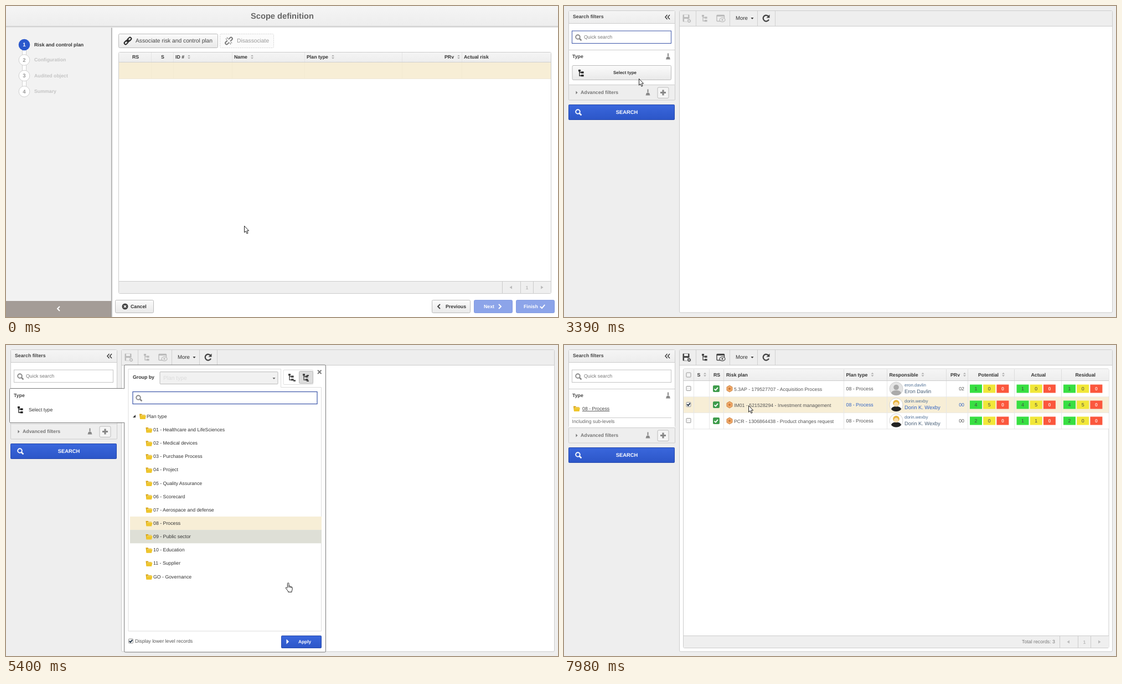
An HTML page for the animation above (8 s loop, 997 px wide and 562 px high).

```html
<!DOCTYPE html>
<html lang="en">
<head>
<meta charset="utf-8">
<title>Scope definition</title>
<style>
html, body { margin: 0; width: 100%; height: 100%; overflow: hidden; background: #eee; }
svg { display: block; width: 100%; height: 100%; font-family: "Liberation Sans", Arial, sans-serif; text-rendering: geometricPrecision; }
</style>
</head>
<body>
<svg id="stage" viewBox="0 0 997 562"></svg>
<script>
const LOOP = 8000;
const BASE = 8.78;

// Markup helpers
const rect = (x, y, w, h, fill, stroke = 'none', rx = 0, extra = '') =>
  `<rect x="${x}" y="${y}" width="${w}" height="${h}" rx="${rx}" fill="${fill}" stroke="${stroke}" ${extra}/>`;
const path = (d, stroke = 'none', width = 1, fill = 'none', extra = '') =>
  `<path d="${d}" stroke="${stroke}" stroke-width="${width}" fill="${fill}" ${extra}/>`;
const circle = (x, y, r, fill, stroke = 'none', width = 1) =>
  `<circle cx="${x}" cy="${y}" r="${r}" fill="${fill}" stroke="${stroke}" stroke-width="${width}"/>`;
const text = (x, y, s, fill = '#333', size = BASE, extra = '') =>
  `<text x="${x}" y="${y}" fill="${fill}" font-size="${size}" ${extra}>${s}</text>`;
const bold = (x, y, s, fill = '#333', size = BASE, extra = '') =>
  text(x, y, s, fill, size, 'font-weight="700" ' + extra);
const group = (id, body, extra = '') => `<g id="${id}" ${extra}>${body}</g>`;
const at = (x, y, body, extra = '') => `<g transform="translate(${x} ${y}) ${extra}">${body}</g>`;
const vlines = (xs, y1, y2, color) => xs.map(x => path(`M${x + .5} ${y1}V${y2}`, color)).join('');
const MID = 'text-anchor="middle"';
const END = 'text-anchor="end"';

// Icons
const chain = (color, broken) => [-1, 1].map(k =>
  rect(k * 4 - 4, -2.4, 8, 4.8, 'none', color, 2.4, 'stroke-width="1.9"')).join('') +
  (broken ? path('M0 -4V4', '#f6f6f6', 3) + path('M-1 -7V-4M2 -7L1.5 -4M-2 7L-1.5 4M1 7V4', color, 1)
          : path('M-3 0H3', color, 1.6));
const sorter = (x, y) => path(`M${x} ${y - 1}l2.5 -2.5l2.5 2.5zM${x} ${y + 1}l2.5 2.5l2.5 -2.5z`, 'none', 1, '#aaa');
const lens = (x, y, color, r = 3.8) =>
  circle(x, y, r, 'none', color, 1.9) + path(`M${x + 3} ${y + 3}l3.4 3.4`, color, 2.6);
const tree = (x, y, c) => at(x, y,
  path('M-3 -5V5H1M-3 -1H1', c, 1.3) + rect(-5, -6, 4, 3.4, c) + rect(0, -2.6, 4.6, 3.4, c) + rect(0, 3, 4.6, 3.4, c));
const brush = (x, y) => at(x, y, rect(-1, -5.5, 2, 6, '#888') + path('M-2.5 1H2.5L4 5.5H-4Z', 'none', 1, '#888'));
const folder = (x, y) => at(x, y,
  path('M0 -4.5H4L5 -3H10.5V4.5H1Z', 'none', 1, '#d9a514') + path('M1.5 -1.5H12L10.5 5H1Z', 'none', 1, '#efc62c') +
  path('M2 -1.8H11', '#fff3b0', .8));
const chevron = (x, y, dir, c, w = 1.9) =>
  path(`M${x - dir * 2} ${y - 4}l${dir * 4} 4l${-dir * 4} 4`, c, w);
const tick = (x, y, c, k = 1) => path(`M${x - 4 * k} ${y}l${3 * k} ${3 * k}l${5 * k} ${-6 * k}`, c, 1.9);
const checkBox = (x, y) => rect(x - 4, y - 4, 8, 8, '#f4f4f4', '#999', 1);
const pager = (y, xs, h) => vlines(xs, y - h, y + h, '#ccc') +
  path(`M${xs[0] + 18} ${y - 3}v6l-4.5 -3zM${xs[2] + 14} ${y - 3}v6l4.5 -3z`, 'none', 1, '#bbb') +
  bold((xs[1] + xs[2]) / 2 + .5, y + 3, '1', '#bbb', BASE, MID);

// Scope definition screen
function scopeScreen() {
  const steps = ['Risk and control plan', 'Configuration', 'Audited object', 'Summary'];
  const stepY = [70, 97.5, 126, 154.5];
  let s = rect(0, 0, 997, 562, '#fff') + rect(0, 38, 190, 524, '#f2f2f2') +
    rect(190, 38, 1, 524, '#999') + rect(191, 38, 2, 524, '#e6e6e6') +
    rect(0, 0, 997, 37, 'url(#bar)') + rect(0, 36.5, 997, 1.2, '#b5b5b5') + rect(0, 37.7, 997, 1.6, '#e8e8e8') +
    bold(499, 22.6, 'Scope definition', '#666', 14.65, MID) +
    rect(0, 533, 190, 29, '#a49c97') + chevron(95, 547, -1, '#fff');
  s += rect(29.5, 75, 7, 76, '#fff', '#d2d2d2');
  steps.forEach((label, i) => {
    const y = stepY[i];
    s += circle(33, y, i ? 9.8 : 10.3, i ? '#fff' : '#2a58cc', i ? '#d0d0d0' : 'none') +
      bold(33, y + 3.4, i + 1, i ? '#999' : '#fff', 9.6, MID) +
      bold(51, y + 2.7, label, i ? '#c4c4c4' : '#333');
  });
  s += `<rect id="assoc" x="203.5" y="50.5" width="179" height="25" rx="2"/>` +
    at(220, 63, chain('#222'), 'rotate(-45)') + text(234, 66, 'Associate risk and control plan', '#444', 10.25) +
    rect(386.5, 50.5, 97, 25, '#fbfbfb', '#ddd', 2, 'stroke-dasharray="3 1"') +
    at(402.5, 63, chain('#777', true), 'rotate(-45)') + text(417, 66, 'Disassociate', '#999', 10.25);
  s += rect(203.5, 83.5, 781, 436, '#fff', '#ccc', 2) + rect(204, 84, 780, 17, 'url(#bar)') +
    rect(204, 101, 780, 1, '#d0d0d0') + rect(204, 102, 780, 29, '#f7eed6') + rect(204, 131, 780, 1, '#eee8d8') +
    vlines([262, 302, 408, 539, 715, 823], 84, 101, '#e4e4e4') +
    vlines([262, 302, 408, 539, 715, 823], 102, 131, '#f3ead2');
  [[228, 'RS'], [280, 'S'], [306, 'ID #'], [412, 'Name'], [543, 'Plan type'], [792, 'PRv'], [827, 'Actual risk']]
    .forEach(([x, label]) => s += bold(x, 95, label));
  [328, 442, 588, 815].forEach(x => s += sorter(x, 92));
  s += rect(204, 497, 780, 22, '#efefef') + rect(204, 497, 780, 1, '#ccc') + pager(508.5, [896, 929, 952], 11);
  const button = (x, fill, stroke) => rect(x + .5, 531.5, 69, 23, fill, stroke, 2);
  s += button(197, 'url(#btn)', '#bbb') + circle(215, 543, 5.5, '#444') + path('M213 541l4 4m0 -4l-4 4', '#fff', 1.4) +
    bold(225, 546, 'Cancel') +
    button(769, 'url(#btn)', '#bbb') + chevron(782, 543, -1, '#444') + bold(794, 546, 'Previous') +
    button(845, '#8ca4e9', '#839be2') + bold(863, 546, 'Next', '#fff') + chevron(892, 543, 1, '#fff') +
    button(921, '#8ca4e9', '#839be2') + bold(935, 546, 'Finish', '#fff') + tick(969, 543, '#fff', 1.05);
  return s;
}

// Search screen: filters on the left, toolbar on the right
function searchScreen() {
  const floppy = c => rect(214.5, 15.5, 12, 13, c, 'none', 1) + rect(217, 16, 7, 4, '#eee') + rect(217, 23, 6, 5, '#eee') +
    circle(226, 27, 3.6, c, '#eee') + path('M224.6 25.6l2.8 2.8m0 -2.8l-2.8 2.8', '#fff', .9);
  const viewer = c => rect(276, 16.5, 13.5, 11, 'none', c, 1, 'stroke-width="1.4"') + rect(276, 16, 13.5, 3, c) +
    `<ellipse cx="286" cy="25" rx="5" ry="3.6" fill="#eee" stroke="${c}" stroke-width="1.2"/>` + circle(286, 25, 1.6, c);
  const tools = c => floppy(c) + tree(254, 22, c) + viewer(c);
  let s = rect(0, 0, 997, 562, '#eee') +
    rect(208.5, 8.5, 782, 545.5, '#fff', '#ccc', 2) + rect(209, 9, 781, 27, '#eee') + rect(209, 36, 781, 1, '#ccc') +
    vlines([238, 299, 349, 381], 9, 36, '#d0d0d0') +
    group('toolsOff', tools('#bbb')) + group('toolsOn', tools('#444')) +
    text(310, 25, 'More', '#333', 9.65) + path('M337.5 21h5l-2.5 3z', 'none', 1, '#333') +
    path('M369.5 19A5.4 5.4 0 1 0 370 24.5', '#444', 2.3) + path('M371.5 15.5v6h-6z', 'none', 1, '#444');
  s += rect(8.5, 8.5, 192, 140, '#fff', '#ccc', 2) + rect(9, 9, 191, 22, 'url(#bar)') + rect(9, 31, 191, 1, '#ccc') +
    bold(16, 22, 'Search filters', '#444') +
    path('M186.5 16l-3.5 4l3.5 4M191 16l-3.5 4l3.5 4', '#444', 1.6) +
    `<rect id="quick" x="14.5" y="45" width="179" height="22.5" fill="#fff"/>` +
    lens(25, 56, '#888') + text(36, 59, 'Quick search', '#777') +
    rect(9, 79, 191, 1, '#ccc') + bold(15, 94, 'Type', '#444') + brush(188, 91);
  s += group('pickType', rect(15, 107.5, 178.5, 26, 'url(#btn)', '#bbb', 2) + tree(31, 121, '#222') +
    bold(110, 123, 'Select type', '#333', 7.95, MID));
  s += group('lower', rect(8.5, 142.5, 192, 27.5, '#eee', '#ccc', 1) +
    path('M21.5 153.5v6l3 -3z', 'none', 1, '#777') + bold(30, 159, 'Advanced filters', '#777') + brush(151.5, 156) +
    rect(169, 147, 20, 19.5, '#f5f5f5', '#bbb', 2) + path('M179 151.5v10M174 156.5h10', '#888', 3.2) +
    rect(8.5, 178.5, 191, 27, 'url(#blue)', '#2549ad', 1) + lens(25, 191, '#fff') +
    bold(113.5, 194.5, 'SEARCH', '#fff', 9.35, MID));
  s += group('chosen', rect(9, 101, 191, 48, '#fff') + folder(17, 115) +
    text(33, 118, '08 - Process', '#444', BASE, 'text-decoration="underline"') +
    rect(14, 131, 180, 1, '#ccc') + text(14.5, 140.5, 'Including sub-levels', '#666'));
  return s;
}

const planTypes = ['01 - Healthcare and LifeSciences', '02 - Medical devices', '03 - Purchase Process', '04 - Project',
  '05 - Quality Assurance', '06 - Scorecard', '07 - Aerospace and defense', '08 - Process', '09 - Public sector',
  '10 - Education', '11 - Supplier', 'GO - Governance'];
const typeY = i => 153 + i * 24.14;

function typePopup() {
  const mark = (id, fill) => `<rect id="${id}" x="224" width="346" height="24.2" fill="${fill}"/>`;
  let s = rect(213.5, 36, 364, 519, '#fff', '#777', 2) + rect(6.5, 78.5, 207, 62, '#fff', '#777', 2) +
    rect(212.5, 79.2, 3, 60.6, '#fff') + bold(14, 94, 'Type', '#444') + tree(26, 117, '#222') + text(41, 120, 'Select type');
  s += path('M221 43.5H496.5V76.5H569.5V517H221Z', '#ddd') + bold(229, 61, 'Group by') +
    rect(278, 48.5, 213, 22, '#f1f1f1', '#bbb', 1) + text(284, 63, 'Plan type', '#dcdcdc', 10.25) +
    path('M481.5 59h5l-2.5 3z', 'none', 1, '#666') +
    rect(501, 45, 53.5, 26.5, '#fff', '#ddd', 2) + rect(529.5, 47.5, 25, 22, '#ddd', '#bbb', 2) +
    tree(515, 58, '#444') + path('M519 64.5h4', '#444', 2.5) + tree(541, 58, '#444') + path('M543 55h4M543 65h4', '#444', 2) +
    path('M563 45.5l6.5 6.5m0 -6.5l-6.5 6.5', '#777', 1.9) +
    rect(229, 84.5, 333, 22, '#fff', '#3b55a8', 0, 'stroke-width="1.2"') + lens(239, 95, '#888') +
    group('caret', rect(249.5, 91, 1, 10, '#333')) + mark('picked', '#f7eed6') + mark('hover', '#dedfd6') +
    path('M229 131h5v-5z', 'none', 1, '#333') + folder(241, 129) + text(254, 132, 'Plan type');
  planTypes.forEach((label, i) => s += folder(252.5, typeY(i) + .5) + text(266, typeY(i) + 3, label));
  s += checkBox(225.5, 535) + tick(225.5, 535, '#234', .7) + text(233, 538, 'Display lower level records', '#555') +
    rect(497.5, 525.5, 72, 22, 'url(#blue)', '#2549ad', 1) +
    group('apply', path('M506.5 531.5v9l4.5 -4.5z', 'none', 1, '#fff') + bold(528, 539, 'Apply', '#fff', 8.3));
  return s;
}

const plans = [
  ['5.3AP - 179527707 - Acquisition Process', 'eron.davlin', 'Eron Davlin', '02', [1, 0, 0], [1, 0, 0], [1, 0, 0]],
  ['IM01 - 521528294 - Investment management', 'dorin.wexby', 'Dorin K. Wexby', '00', [4, 5, 0], [4, 5, 0], [4, 5, 0]],
  ['PCR - 1306864438 - Product changes request', 'dorin.wexby', 'Dorin K. Wexby', '00', [2, 0, 0], [1, 1, 0], [2, 0, 0]]
];

function resultTable() {
  let s = rect(215.5, 43, 768.5, 504.5, '#fff', '#ccc', 2) + rect(216, 43.5, 768, 21, 'url(#bar)') + rect(216, 64, 768, 1, '#ccc');
  plans.forEach((_, i) => s += `<rect id="row${i}" x="216" y="${65 + i * 29}" width="768" height="28.5"/>` +
    rect(216, 93.5 + i * 29, 768, .8, '#ddd'));
  const cols = [234, 262, 288, 505, 583, 690, 729, 813, 898];
  s += vlines(cols, 44, 64, '#ddd') + vlines(cols, 65, 152, '#e6e6e6') + checkBox(225, 54);
  [[240.5, 'S'], [270, 'RS'], [293, 'Risk plan'], [509.5, 'Plan type'], [587.5, 'Responsible'], [698, 'PRv'],
    [748, 'Potential'], [843.5, 'Actual'], [923.5, 'Residual']].forEach(([x, label]) => s += bold(x, 56.5, label));
  [252, 554.5, 645.5, 721, 791].forEach(x => s += sorter(x, 53.5));
  plans.forEach(([name, user, person, prv, ...scores], i) => {
    const y = 79 + i * 29;
    const y2 = y - (i === 2 ? .5 : 0);
    s += checkBox(225, y - .5) + group('check' + i, tick(225, y - .8, '#234', .7)) +
      rect(269, y - 6, 12, 12, '#3f9c4c', 'none', 2) + tick(274.7, y + .3, '#fff', .8) +
      path(`M299 ${y - 6}l5 3v6l-5 3l-5 -3v-6z`, '#c9803f', .9, '#f0a868') + circle(299, y, 2, '#c9793a') +
      text(307, y + 3.5, name, '#555');
    const yellow = i > 0;
    s += circle(600, y2, 12, yellow ? '#fff' : '#e4e4e4', '#ccc', .9) +
      path(`M591 ${y2 + 8}q1 -5 9 -5q8 0 9 5q-3 4 -9 4q-6 0 -9 -4z`, 'none', 1, yellow ? '#222' : '#aaa') +
      (yellow ? circle(600, y2 - 3, 5.8, '#e6b23c') + circle(600, y2 - .8, 4.2, '#f8dcae') : circle(600, y2 - 2.5, 4.8, '#aaa'));
    s += group('link' + i, text(509.5, y2 + 3, '08 - Process', 'inherit') + text(723, y2 + 3, prv, 'inherit', BASE, END)) +
      text(615, y2 - 4, user, '#4d6e94', 7.95) + group('name' + i, text(615, y2 + 8, person, 'inherit', 9.35));
    [733, 817.5, 902].forEach((x, k) => scores[k].forEach((n, j) =>
      s += rect(x + j * 24.2, y - 7.5, 22, 15, ['#38df42', '#f1e738', '#fb573d'][j]) +
        (j === 2 ? bold : text)(x + j * 24.2 + 11, y + 3, n, j === 2 ? '#ffd9d0' : '#444', BASE, MID)));
  });
  s += rect(216, 525, 768, 22, '#efefef') + rect(216, 525, 768, 1, '#ccc') +
    text(887, 539, 'Total records: 3', '#777', BASE, END) + pager(536.5, [895, 928, 951], 11);
  return s;
}

const gradient = (id, a, b) => `<linearGradient id="${id}" x2="0" y2="1"><stop stop-color="${a}"/><stop offset="1" stop-color="${b}"/></linearGradient>`;
const arrow = path('M.5 .5V12.2L3.1 9.8L5 14.3L7 13.4L5.1 9.1H8.6Z', '#222', 1, '#fff');
const hand = path('M4 9V2q0 -1.5 1.3 -1.5T6.6 2V6.2q2 -.7 2.3 .7q1.8 -.5 2 .8q1.8 -.2 1.8 1.5V12q0 1.5 -1 3V17H5.2V15.5L1 10.3q-.6 -1.2 .4 -1.6T4 10.3M6.6 6V9M8.9 7V9.3M10.9 7.7V9.6', '#222', 1, '#fff');

document.getElementById('stage').innerHTML =
  '<defs>' + gradient('bar', '#f5f5f5', '#ededed') + gradient('btn', '#fbfbfb', '#e9e9e9') + gradient('blue', '#3a67dc', '#2c56c8') + '</defs>' +
  group('scope', scopeScreen()) + group('search', searchScreen()) + group('results', resultTable()) + group('popup', typePopup()) +
  group('cursor', group('arrow', arrow) + group('hand', hand));

const el = {};
document.querySelectorAll('[id]').forEach(e => el[e.id] = e);
const show = (id, on) => el[id].setAttribute('display', on ? 'inline' : 'none');
const set = (id, name, value) => el[id].setAttribute(name, value);

// Pointer route: time, x, y
const route = [
  [0, 430, 397], [410, 430, 397], [1190, 98, 248], [1280, 98, 247], [1560, 98, 247], [2040, 281, 56], [2640, 281, 56],
  [3390, 135, 131], [3450, 135, 131], [3700, 111, 115], [4260, 111, 115], [4620, 317, 294], [5010, 300, 325],
  [5100, 300, 325], [5400, 504, 429], [5700, 530, 537], [5880, 530, 537], [6570, 387, 206], [6690, 387, 205],
  [7380, 376, 109], [7530, 376, 109], [7680, 476, 119], [7860, 476, 119], [7970, 333, 109], [8000, 333, 109]
];

// Smooth through passing points, at rest where the pointer pauses
function slope(i, k) {
  const a = route[i - 1], b = route[i], c = route[i + 1];
  if (!a || !c) return 0;
  const before = b[k] - a[k], after = c[k] - b[k];
  return before * after <= 0 ? 0 : (before + after) / (c[0] - a[0]);
}
function pointer(t) {
  let i = 0;
  while (i < route.length - 2 && t >= route[i + 1][0]) i++;
  const a = route[i], b = route[i + 1], d = b[0] - a[0], u = (t - a[0]) / d, v = 1 - u;
  return [1, 2].map(k => a[k] * (1 + 2 * u) * v * v + slope(i, k) * d * u * v * v +
    b[k] * u * u * (3 - 2 * u) - slope(i + 1, k) * d * u * u * v);
}

function hoveredType(t, y) {
  if (t >= 4300 && t < 5130) {
    const row = Math.round((y - 11 - typeY(0)) / 24.14);
    return t < 4680 ? Math.max(0, Math.min(5, row)) : Math.min(7, row);
  }
  return t >= 5130 && t < 5460 ? 8 : -1;
}

function render(t) {
  const [x, y] = pointer(t);
  const onScope = t < 2700, popup = t >= 3750 && t < 5910, results = t >= 6180;
  show('scope', onScope);
  show('search', !onScope);
  show('popup', popup);
  show('results', results);

  const pressed = t >= 2010;
  set('assoc', 'fill', pressed ? '#dedede' : 'url(#btn)');
  set('assoc', 'stroke', pressed ? '#6283d6' : '#bbb');
  set('assoc', 'stroke-width', pressed ? 2 : 1);

  const applied = t >= 5910;
  set('quick', 'stroke', t < 3750 ? '#3b55a8' : '#c4c4c4');
  show('pickType', !applied);
  show('chosen', applied);
  set('lower', 'transform', `translate(0 ${applied ? 7 : 0})`);
  show('toolsOff', !results);
  show('toolsOn', results);

  const hover = hoveredType(t, y);
  show('hover', hover >= 0);
  set('hover', 'y', typeY(hover) - 12);
  show('picked', t >= 5070);
  set('picked', 'y', typeY(7) - 12);
  show('caret', popup && t % 1000 >= 500);
  show('apply', t >= 5070);

  const selected = t < 7350 ? 0 : 1;
  plans.forEach((_, i) => {
    const over = y >= 65 + i * 29 && y < 94 + i * 29;
    set('row' + i, 'fill', i === selected ? '#f7eed6' : i === 1 ? '#efefef' : '#fff');
    set('link' + i, 'fill', over ? '#2f62c4' : '#555');
    set('name' + i, 'fill', over ? '#2f62c4' : '#4a6078');
    show('check' + i, i === selected);
  });

  const pointing = t >= 1920 && t < 2700 || t >= 3450 && t < 5910;
  show('hand', pointing);
  show('arrow', !pointing);
  set('cursor', 'transform', `translate(${x.toFixed(1)} ${y.toFixed(1)})`);
}

function tick60(now) {
  render(now % LOOP);
  requestAnimationFrame(tick60);
}
render(0);
requestAnimationFrame(tick60);
</script>
</body>
</html>
```
